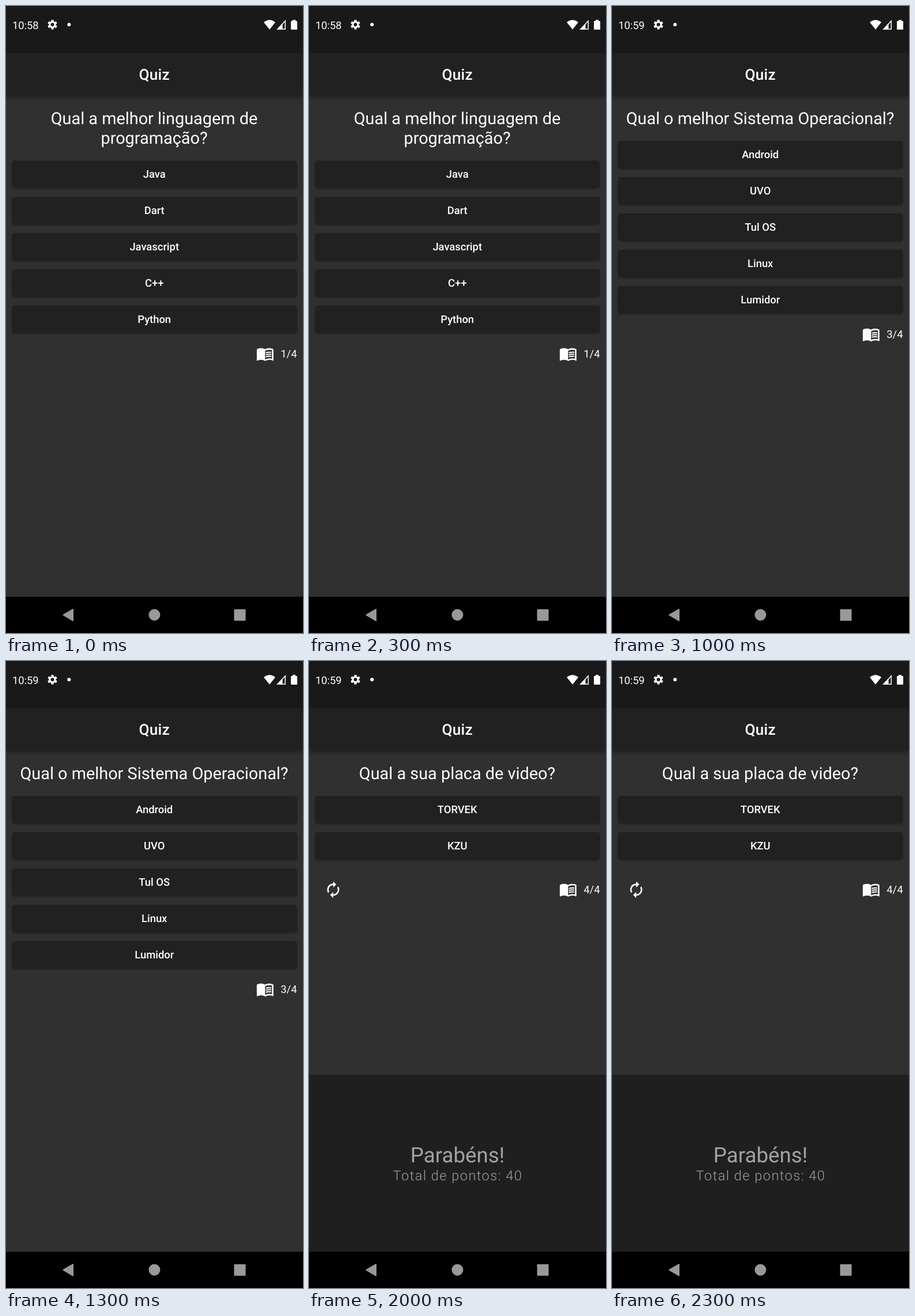
Animation, 515 px wide and 1088 px high, one loop 2500 ms. Source, as an HTML page:

```html
<!DOCTYPE html>
<html lang="pt">
<head>
<meta charset="utf-8">
<title>Quiz</title>
<style>
html, body { margin: 0; width: 100%; height: 100%; overflow: hidden; background: #303030; }
svg { display: block; width: 515px; height: 1088px; }
text { font: 18.36px Roboto, sans-serif; fill: #fff; text-anchor: middle; text-rendering: geometricPrecision; }
.title { font-size: 26.2px; font-weight: 500; letter-spacing: .2px; }
.question { font-size: 28.85px; }
.label { font-weight: 500; }
.end { text-anchor: end; }
.button { fill: #212121; filter: drop-shadow(0 2px 1.5px rgba(0, 0, 0, .32)); }
.bar { fill: #212121; filter: drop-shadow(0 3px 3px rgba(0, 0, 0, .35)); }
.cheer { font-size: 36.7px; fill: #a2a2a2; }
.score { font-size: 23.6px; font-weight: 300; letter-spacing: 1.45px; fill: #a0a0a0; }
</style>
</head>
<body>
<svg viewBox="0 0 515 1088">
  <defs>
    <g id="book">
      <path fill="#fff" fill-rule="evenodd" d="M21 5c-1.1-.35-2.3-.5-3.5-.5-1.95 0-4.05.4-5.5 1.5-1.45-1.1-3.55-1.5-5.5-1.5S2.45 4.9 1 6v14.65c0 .3.3.6.75.45C3.1 20.45 5.05 20 6.5 20c1.95 0 4.05.4 5.5 1.5 1.35-.85 3.8-1.5 5.5-1.5 1.65 0 3.35.3 4.75 1.05.4.2.75-.1.75-.45V6c-.6-.45-1.25-.75-2-1zm0 13.5c-1.1-.35-2.3-.5-3.5-.5-1.7 0-4.15.65-5.5 1.5V8c1.35-.85 3.8-1.5 5.5-1.5 1.2 0 2.4.15 3.5.5z"/>
      <path fill="none" stroke="#fff" stroke-width="1.5" d="M13 10.65q2.8-1.2 7-.65M13 13.3q2.8-1.2 7-.65M13 15.95q2.8-1.2 7-.65"/>
    </g>
    <path id="renew" fill="#fff" d="M12 6v3l4-4-4-4v3c-4.42 0-8 3.58-8 8 0 1.57.46 3.03 1.24 4.26L6.7 14.8c-.45-.83-.7-1.79-.7-2.8 0-3.31 2.69-6 6-6zm6.76 1.74L17.3 9.2c.44.84.7 1.79.7 2.8 0 3.31-2.69 6-6 6v-3l-4 4 4 4v-3c4.42 0 8-3.58 8-8 0-1.57-.46-3.03-1.24-4.26z"/>
  </defs>
  <rect width="515" height="1088" fill="#303030"/>
  <rect class="bar" y="81" width="515" height="74"/>
  <rect width="515" height="81.5" fill="#191919"/>
  <text class="title" x="257.2" y="127.9">Quiz</text>

  <!-- status bar -->
  <text id="clock" x="33.8" y="39.6"></text>
  <g fill="none" stroke="#fff">
    <circle cx="80.5" cy="32.3" r="4.6" stroke-width="3.2"/>
    <circle cx="80.5" cy="32.3" r="7" stroke-width="2.8" pathLength="6" stroke-dasharray=".56 .44" stroke-dashoffset="-.22"/>
    <path stroke-width="1.5" d="M471 40.2H484.2V26z"/>
  </g>
  <g fill="#fff">
    <circle cx="109.3" cy="32.2" r="3"/>
    <path d="M447 28.3Q457 20.3 467 28.3L457 40.8z"/>
    <path d="M469.3 41L479.5 30V41z"/>
    <path d="M497 24h5v2h2q1 0 1 1v13q0 1-1 1h-9q-1 0-1-1V27q0-1 1-1h2z"/>
  </g>

  <g id="quiz"></g>

  <!-- navigation bar -->
  <rect y="1025" width="515" height="63"/>
  <g fill="#999" stroke="#999" stroke-linejoin="round" stroke-width="2">
    <path d="M99.5 1056.7L116 1047V1066.5z"/>
    <circle cx="257.4" cy="1056.5" r="9"/>
    <rect x="396.5" y="1047.8" width="18" height="18"/>
  </g>
</svg>
<script>
const step = 500, rowGap = 62.95, iconSize = 1.3114;
const lastQuestion = { lines: ['Qual a sua placa de video?'], answers: ['TORVEK', 'KZU'], last: true };
const screens = [
  { lines: ['Qual a melhor linguagem de', 'programação?'], answers: ['Java', 'Dart', 'Javascript', 'C++', 'Python'] },
  { lines: ['Qual o melhor Framework?'], answers: ['React Native', 'Flutter', 'Telavodo', 'Vue JS', 'Angular'] },
  { lines: ['Qual o melhor Sistema Operacional?'], answers: ['Android', 'UVO', 'Tul OS', 'Linux', 'Lumidor'] },
  lastQuestion,
  { ...lastQuestion, done: true }
];

const text = (cls, x, y, content) => `<text class="${cls}" x="${x}" y="${y}">${content}</text>`;
const icon = (id, x, y) =>
  `<use href="#${id}" transform="translate(${x} ${y}) scale(${iconSize}) translate(-12 -12)"/>`;

function build({ lines, answers, last, done }, index) {
  const top = 223.8 + 33.9 * lines.length;
  const rowY = top + rowGap * (answers.length - 1) + (last ? 76.4 : 60.7);
  let out = lines.map((line, i) => text('question', 257, 205 + 33.9 * i, line)).join('');
  answers.forEach((answer, i) => {
    const y = top + rowGap * i;
    out += `<rect class="button" x="10.5" y="${y - 23.6}" width="494" height="47.2" rx="5"/>`;
    out += text('label', 257.2, y + 6.4, answer);
  });
  out += icon('book', 449.3, rowY - .5) + text('end', 504.5, rowY + 6.2, `${Math.min(index + 1, 4)}/4`);
  if (last) out += icon('renew', 42, rowY - .2);
  if (done) {
    out += '<rect y="718" width="515" height="307" fill="#1f1f1f"/>';
    out += text('cheer', 257.5, 870, 'Parabéns!') + text('score', 258, 901.4, 'Total de pontos: 40');
  }
  return out;
}

const quiz = document.getElementById('quiz'), clock = document.getElementById('clock');
let shown = -1;
function draw() {
  const index = Math.floor(performance.now() / step) % screens.length;
  if (index !== shown) {
    shown = index;
    quiz.innerHTML = build(screens[index], index);
    clock.textContent = index ? '10:59' : '10:58';
  }
  requestAnimationFrame(draw);
}
draw();
</script>
</body>
</html>
```
